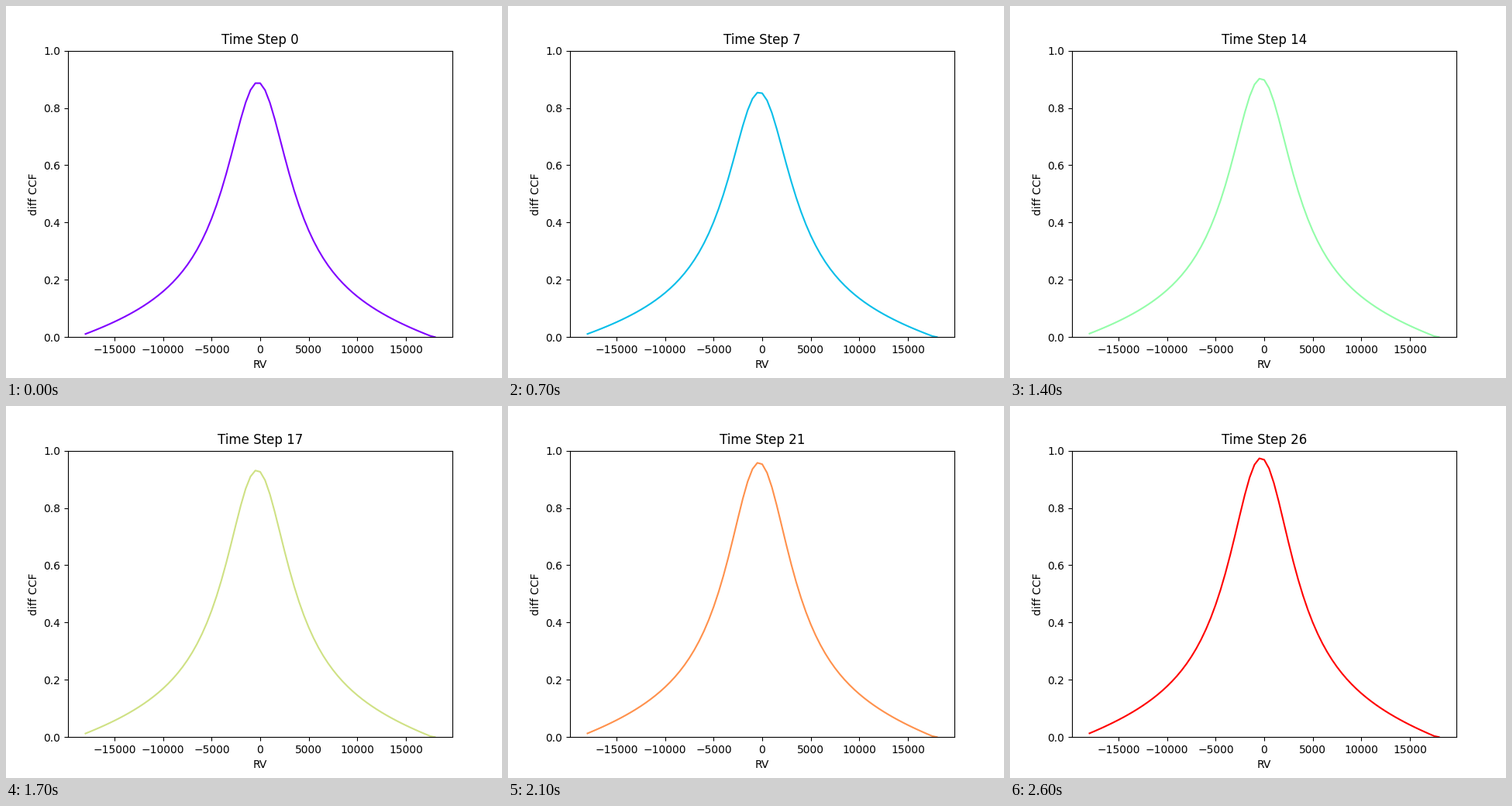
A matplotlib script for the animation above (2700 ms loop, 640 px wide and 480 px high).

```python
import numpy as np
import matplotlib.pyplot as plt
from matplotlib.animation import FuncAnimation

STEPS = 27
INTERVAL = 100
EDGE = 18.35     # where the wings reach zero, in thousands
TILT = 0.0002    # left wing sits slightly above the right one

rv = np.arange(-18000, 18001, 500)
colors = plt.cm.rainbow(np.linspace(0, 1, STEPS))

# Peak height dips, recovers and levels off
height = np.poly1d(np.polyfit([0, 3, 7, 14, 19, 26],
                              [.8895, .8655, .8555, .9035, .9475, .9745], 5))


def center(step):
    """Peak position: eases a little to the left early on."""
    t = np.clip((step - 2) / 10, 0, 1)
    return -250 - 85 * (1 - np.cos(np.pi * t)) / 2


def profile(step):
    """Round core, long wings, tapered to zero at the edge."""
    d = (rv - center(step)) / 1000
    taper = 1 - (d / EDGE) ** 2
    falloff = 1 + 0.053 * d**2 / np.sqrt(1 + (d / 7.4) ** 2)
    return np.maximum(height(step) * (taper / falloff - TILT * d), 0)


fig, ax = plt.subplots(figsize=(6.4, 4.8), dpi=100)
line, = ax.plot(rv, profile(0))
ax.set_xlim(-19800, 19800)
ax.set_ylim(0, 1)
ax.set_xlabel("RV")
ax.set_ylabel("diff CCF")
title = ax.set_title("Time Step 0")


def update(step):
    line.set_ydata(profile(step))
    line.set_color(colors[step])
    title.set_text(f"Time Step {step}")
    return line, title


anim = FuncAnimation(fig, update, frames=STEPS, interval=INTERVAL,
                     repeat=True, repeat_delay=0)
plt.show()
```
